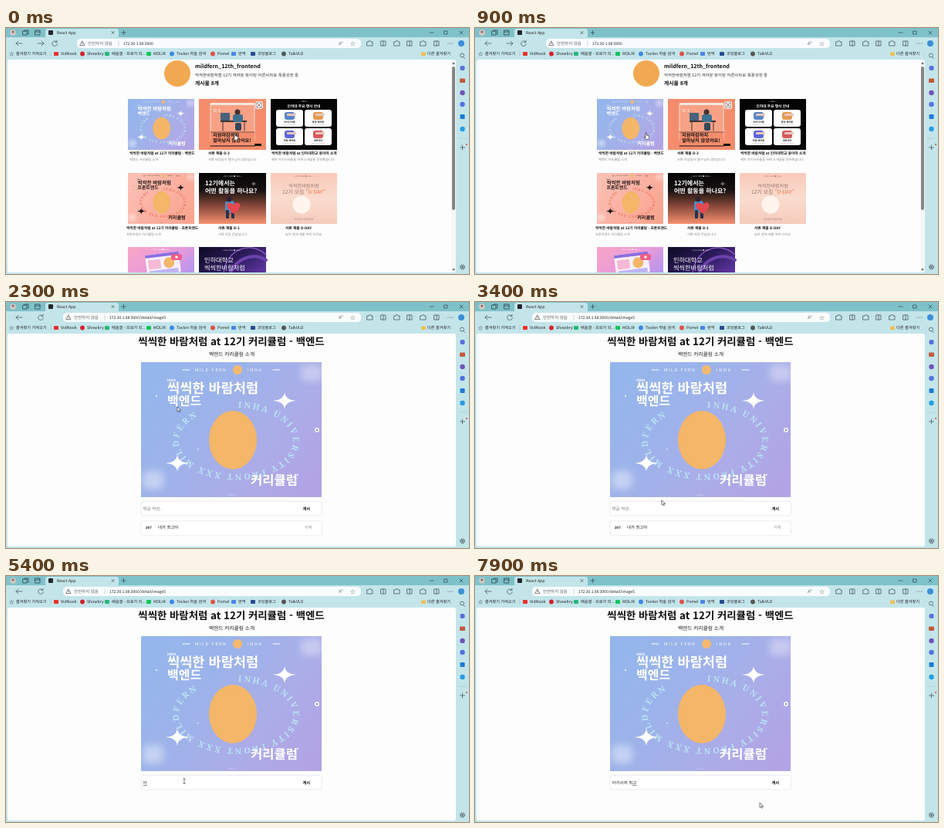
An HTML page that plays this animation: 600 by 319 pixels, repeating every 8 s.

```html
<!DOCTYPE html>
<html lang="ko">
<head>
<meta charset="utf-8">
<title>React App</title>
<style>
html, body { margin: 0; width: 100%; height: 100%; overflow: hidden; background: #c3e5ea; }
svg { display: block; width: 600px; height: 319px; }
text { font-family: "Noto Sans CJK KR", "Noto Sans CJK", sans-serif; text-rendering: geometricPrecision; }
.ring { font: bold 11px "Noto Serif", "Liberation Serif", serif; letter-spacing: 2.5px; }
</style>
</head>
<body>
<svg id="stage" viewBox="0 0 600 319"></svg>
<script>
const CLUB = '씩씩한 바람처럼', CLUB1 = '씩씩한바람처럼';

// y is the vertical middle of the text
const text = (x, y, s, size = 5.2, fill = '#222', weight = 400, anchor = 'start', extra = '') =>
  `<text x="${x}" y="${y + size * .36}" font-size="${size}" fill="${fill}" font-weight="${weight}" text-anchor="${anchor}" ${extra}>${s}</text>`;
const rect = (x, y, w, h, fill, r = 0, extra = '') =>
  `<rect x="${x}" y="${y}" width="${w}" height="${h}" rx="${r}" fill="${fill}" ${extra}/>`;
const dot = (x, y, r, fill, extra = '') => `<circle cx="${x}" cy="${y}" r="${r}" fill="${fill}" ${extra}/>`;
const line = (d, color = '#4a5a5e', w = .8) =>
  `<path d="${d}" fill="none" stroke="${color}" stroke-width="${w}" stroke-linecap="round" stroke-linejoin="round"/>`;
const at = (x, y, body, extra = '') => `<g transform="translate(${x} ${y}) ${extra}">${body}</g>`;
const grad = (id, dir, ...colors) => `<linearGradient id="${id}" ${dir}>` +
  colors.map((c, i) => `<stop offset="${i / (colors.length - 1)}" stop-color="${c}"/>`).join('') + '</linearGradient>';
const down = 'x1="0" y1="0" x2="0" y2="1"', diag = 'x1="0" y1=".2" x2="1" y2=".8"';

const defs = `<defs>
  ${grad('blue', diag, '#94b6ec', '#9cb3ea', '#aaade8', '#b2a4e4')}
  ${grad('peach', diag, '#fbc0b4', '#fbb1a2', '#f9a58f')}
  ${grad('dusk', down, '#050505', '#171010', '#8c4c3c', '#f49070')}
  ${grad('dday', down, '#f9c9ba', '#fadccf', '#f5cbbb')}
  ${grad('pink', diag, '#f6a5c8', '#e99bd8', '#b795ee')}
  ${grad('night', diag, '#120d2c', '#2b1a59', '#5e35a0')}
  <filter id="soft" x="-50%" y="-50%" width="200%" height="200%"><feGaussianBlur stdDeviation="5"/></filter>
  <path id="orbit" d="M123 59A74 43 0 1 1 122.9 59"/>
  <clipPath id="frame"><rect width="234" height="175"/></clipPath>
  <clipPath id="page"><rect x="2" y="41" width="581" height="276" rx="3"/></clipPath>
</defs>`;

const spark = (x, y, c, scale = 1) =>
  `<path transform="translate(${x} ${y}) scale(${scale})" fill="${c}" d="M0-11Q1-1 15 0Q1 1 0 11Q-1 1-15 0Q-1-1 0-11"/>`;

// Course poster, 234 x 175
const poster = (bg, ink, ring, course) => `<g clip-path="url(#frame)">
  ${rect(0, 0, 234, 175, `url(#${bg})`)}
  ${rect(2, 141, 27, 24, '#fff', 7, 'opacity=".4" filter="url(#soft)"')}
  ${rect(207, 3, 28, 22, '#fff', 7, 'opacity=".35" filter="url(#soft)"')}
  ${line('M54 10h9M171 10h9', ink, 1)}
  ${text(70, 10, 'MILD FERN', 5.3, ink, 500, 'start', 'letter-spacing="1.6"')}
  ${text(138, 10, 'INHA', 5.3, ink, 500, 'start', 'letter-spacing="1.8"')}
  ${dot(125, 10, 6, '#f4b96e')}
  ${text(34, 23.5, 'INHA', 4.5, ink, 900)}
  ${text(34, 34, CLUB, 17.6, ink, 900)}
  ${text(34, 50, course, 16, ink, 900)}
  <text class="ring" fill="${ring}"><textPath href="#orbit" startOffset="3">INHA UNIVERSITY FRONT XXX MILDFERN</textPath></text>
  ${spark(186, 50, ink)}${spark(47, 131, ink)}${dot(20, 44, 1, ink)}${dot(74, 113, .8, ink)}
  <ellipse cx="119" cy="101" rx="31" ry="38" fill="#f4b668"/>
  ${text(142, 153, '커리큘럼', 16.6, ink, 900)}
  ${dot(203, 146, .9, ink)}${[-3, 0, 3].map(d => dot(117 + d, 172, .6, ink)).join('')}
</g>`;
const thumb = (x, y, ...p) => at(x, y, poster(...p), 'scale(.3675 .377)');

const dueCard = at(250, 92, rect(0, 0, 87, 66, '#f58d6d') +
  rect(15, 7, 57, 46, '#f9a184', 0, 'stroke="#fff" stroke-width=".7"') +
  rect(15, 5, 57, 3, '#f8e6df') + text(19, 15, 'D-3', 5.5, '#fff', 500) +
  rect(28, 28, 34, 2, '#3c3434') + line('M31 30v11M59 30v11', '#3c3434', 1) +
  rect(28, 18, 12, 10, '#49617d', 1) + dot(50, 17, 3.5, '#43322e') +
  rect(44, 20, 13, 10, '#3d7190', 3) + rect(47, 31, 8, 10, '#35465c', 2) +
  rect(15, 43, 57, 18, '#f58d6d') + line('M15 43h57', '#222', .6) +
  text(18, 47, '지원마감까지', 6.2, '#111', 900) + text(18, 54, '얼마남지 않았어요!', 6.2, '#111', 900) +
  line('M15 61h57', '#111', 1) + rect(72, 58, 9, 3, '#111'));

const eventCard = at(343, 92, rect(0, 0, 86, 66, '#050505') +
  text(43, 3.5, '— INHA —', 2.5, '#ddd', 400, 'middle') +
  text(43, 9, '인하대 주요 행사 안내', 4.7, '#fff', 700, 'middle') +
  [['#5a86c8', '아이디어톤'], ['#e39b52', '중앙 해커톤'], ['#5c68d8', '연합 해커톤'], ['#d85a5a', '데모데이']]
    .map(([c, s], i) => at(7 + i % 2 * 37, 14 + (i >> 1) * 24,
      rect(0, 0, 35, 22, '#fff', 3) + rect(11, 3, 13, 10, c, 3) + rect(14, 5, 12, 3, '#e8c7ba', 1) +
      text(17.5, 16, s, 3.2, '#222', 700, 'middle') + line('M9 19.5h17', '#bbb', .5))).join(''));

const workCard = at(250, 188, rect(0, 0, 87, 66, 'url(#dusk)') +
  text(43, 4, '—  MILD FERN  ●  INHA  —', 2.3, '#ddd', 400, 'middle') +
  text(8, 13.5, '12기에서는', 8, '#fff', 800) + text(8, 23, '어떤 활동을 하나요?', 8, '#fff', 800) +
  spark(71, 14, '#fff6', .3) +
  rect(34, 36, 12, 15, '#4a91ce', 4) + dot(39, 34, 3.6, '#2f2430') + rect(35, 48, 4, 11, '#26344d', 1) +
  rect(42, 48, 4, 11, '#26344d', 1) +
  `<path d="M45 53C30 42 37 35 45 41C52 34 60 43 45 53" fill="#e6484e"/>`);

const ddayCard = at(343, 188, rect(0, 0, 86, 66, 'url(#dday)') +
  text(43, 4, '—  MILD FERN  ●  INHA  —', 2.3, '#9b7468', 400, 'middle') +
  text(43, 16.5, CLUB1, 6.2, '#96776d', 400, 'middle') +
  text(43, 25, '12기 모집 <tspan fill="#ee764e">"D-DAY"</tspan>', 6.8, '#96776d', 500, 'middle') +
  dot(40, 41, 11.5, '#fff5ed') + text(43, 60, '지금 바로 지원하세요', 2.8, '#9b7468', 400, 'middle'));

const screenCard = at(158, 284, rect(0, 0, 86, 36, 'url(#pink)') +
  text(43, 3, '—  MILD FERN  ●  INHA  —', 2.3, '#fff', 400, 'middle') +
  at(22, 11, rect(0, 0, 44, 27, '#f7f0ff', 2) + rect(0, 0, 44, 4, '#8a6ee0', 1) +
    rect(3, 7, 16, 12, '#f6b9d5', 1) + rect(3, 21, 38, 6, '#bfb4f4') + dot(30, 13, 7, '#f4b668'), 'rotate(-7)') +
  rect(56, 9, 14, 8, '#ef5d88', 3) + dot(63, 13, 1.8, '#fff'));

const schoolCard = at(250, 284, rect(0, 0, 87, 36, 'url(#night)') +
  line('M32 36A33 36 0 0 1 87 10', '#9261cf', 1.2) + line('M40 36A33 36 0 0 1 87 17', '#6a43ab', 4) +
  text(43, 4, '—  MILD FERN  ●  INHA  —', 2.3, '#ddd', 400, 'middle') +
  text(7, 17, '인하대학교', 8.2, '#fff', 500) + text(7, 27, CLUB1, 8.2, '#fff', 500));

const caption = (x, y, title, sub) => text(x, y, title, 4.7, '#111', 700) + text(x, y + 8, sub, 4.2, '#8a8a8a');

// Back, optional forward, reload, and the address field
const nav = (dx, url) => line('M21 20h-8m3-3l-3 3l3 3') +
  (dx ? line('M41 20h8m-3-3l3 3l-3 3') : '') +
  at(45 + dx, 20, line('M2.5-2A3.3 3.3 0 1 0 3.3 .6M3-3.8v2.2h-2.2')) +
  rect(74 + dx, 14, 386 - dx, 12, '#f8fcfd', 5) +
  line(`M${81 + dx} 17.2l3 5.4h-6zM${81 + dx} 19v1.5`, '#555', .7) +
  text(88 + dx, 20, '안전하지 않음', 5.5, '#666') + line(`M${128 + dx} 17v6`, '#bbb', .6) +
  text(134 + dx, 20, url, 5, '#222') + text(431, 20, 'A⁾⁾', 5.5, '#666') + text(446, 20, '☆', 7, '#666');

const bookmarks = [
  [65, '#f22d2d', 'VidNook', 1], [99, '#d6202b', 'Showbry'], [131, '#29b779', '배움결 - 프로가 되...', 1],
  [185, '#12c45c', 'MOLIR', 1], [215, '#3f87e8', 'Tovlen 학술 검색'], [268, '#e15045', 'Pomel'],
  [295, '#4a86e8', '번역', 1], [320, '#2b4a92', '코딩블로그', 1], [360, '#555', 'TalkVLO']
].map(([x, c, s, square]) => (square ? rect(x - 3, 31, 6, 5, c, 1) : dot(x, 33.5, 2.9, c)) +
  text(x + 6, 33.5, s)).join('');

const toolIcons = [471, 489, 506, 523, 540, 558].map((x, i) => i % 2
  ? line(`M${x - 3} 17h6v6h-6zM${x} 17v6`) : line(`M${x - 3} 18h2a1.5 1.5 0 0 1 3 0h2v5h-7z`)).join('') +
  [573, 576, 579].map(x => dot(x, 20, .6, '#445')).join('');

const sidebar = line('M592.5 37.5l2 2') + dot(591, 35.5, 2.5, 'none', 'stroke="#4a5a5e" stroke-width=".8"') +
  rect(588.5, 49, 6, 6, '#5a71d8', 2) + rect(588, 65.5, 7, 5.5, '#c35a3b', 1) +
  dot(591.5, 84, 3.2, '#7052b6') + dot(591.5, 99, 3.2, '#5470df') + rect(588.5, 112, 6, 6, '#1b7bd0', 1) +
  dot(591.5, 131, 3.2, '#269de4') + line('M586 143h11', '#99bcc3', .5) + line('M588.5 155h6M591.5 152v6') +
  dot(597, 151, 1, '#d34a34') + dot(591.5, 310, 2.7, 'none', 'stroke="#4a5a5e" stroke-width="1.3" stroke-dasharray="1.5 .6"') +
  dot(591.5, 310, 1.2, '#4a5a5e');

const chrome = rect(0, 0, 600, 319, '#c3e5ea') + rect(0, 0, 600, 12, '#7fc1c9') +
  rect(51, 1, 95, 12, '#c3e5ea', 3) + dot(9, 6, 3.8, '#d9c9c2') + dot(9, 5, 1.6, '#7b6a68') +
  line('M22 4h5v5h-5zM24 4v-1h5v5h-1M38 3h6v6h-6zM38 5h6', '#29474c') +
  rect(55, 3, 6, 6, '#24262b', 1) + text(66, 6, 'React App', 5.2) +
  line('M137 4.5l3 3m0-3l-3 3M150 6h5M152.5 3.5v5', '#29474c', .7) +
  line('M549 6h5M568 4h4v4h-4zM588 4l4 4m0-4l-4 4', '#29474c', .7) +
  toolIcons + dot(590, 20, 4, '#3c8fd6') + text(4, 33.5, '☆', 6.5) + text(13, 33.5, '즐겨찾기 가져오기') +
  line('M58 30.5v6', '#92b5bb', .5) + bookmarks +
  rect(538, 31.5, 6, 4.5, '#eec04f', 1) + text(546, 33.5, '다른 즐겨찾기') + sidebar +
  rect(2, 41, 581, 276, '#fdfdfe', 3);

const list = `<g id="list">${nav(18, '172.30.1.98:3000')}<g clip-path="url(#page)">
  ${dot(222, 59, 17, '#f1a951')}
  ${text(245, 49, 'mildfern_12th_frontend', 7.1, '#111', 700)}
  ${text(245, 61.5, CLUB1 + ' 12기 여러분 화이팅 어른사자로 폭풍성장 중', 5.4, '#333')}
  ${text(245, 71.5, '게시물 8개', 6.8, '#111', 700)}
  ${thumb(158, 92, 'blue', '#fff', '#b9e2f4', '백엔드')}${dueCard}${eventCard}
  ${thumb(158, 188, 'peach', '#241817', '#ee6f55', '프론트엔드')}${workCard}${ddayCard}${screenCard}${schoolCard}
  ${caption(160, 162.5, CLUB + ' at 12기 커리큘럼 - 백엔드', '백엔드 커리큘럼 소개')}
  ${caption(262, 162.5, '서류 제출 D-3', '서류 마감일이 얼마 남지 않았습니다')}
  ${caption(344, 162.5, CLUB + ' at 인하대학교 동아리 소개', '예비 아기사자들을 위해 소개글을 준비했습니다')}
  ${caption(156, 259, CLUB + ' at 12기 커리큘럼 - 프론트엔드', '프론트엔드 커리큘럼 소개')}
  ${caption(275, 259, '서류 제출 D-1', '서류 마감 전날입니다')}
  ${caption(362, 259, '서류 제출 D-DAY', '늦지 않게 제출 부탁 드려요')}
  ${rect(577, 41, 6, 276, '#f6f6f7')}${rect(578, 50, 4, 186, '#858585', 2)}
  <path d="M578 47l2-3l2 3zM578 312l2 3l2-3z" fill="#777"/>
  <g id="lens">${rect(-5, -5, 10, 10, '#f3f0ef', 3, 'opacity=".9"')}${line('M-3-1v-2h2M1-3h2v2M3 1v2h-2M-1 3h-2v-2', '#666', .7)}${dot(0, 0, 1.1, '#666')}</g>
</g></g>`;

const detail = `<g id="detail">${nav(0, '172.30.1.98:3000/detail/image5')}
  ${text(292, 51, CLUB + ' at 12기 커리큘럼 - 백엔드', 13.4, '#111', 700, 'middle')}
  ${text(292.5, 68, '백엔드 커리큘럼 소개', 6.7, '#222', 400, 'middle')}
  ${at(175, 78, poster('blue', '#fff', '#b9e2f4', '백엔드'))}
  ${dot(403, 166, 3, '#f3f4fc')}${dot(403, 166, 1.2, '#8d91b4')}
  ${rect(175, 258.5, 234.5, 18.5, '#fff', 3, 'stroke="#e4e4e8" stroke-width=".7"')}
  ${text(177.5, 268, '', 5.5, '#222', 400, 'start', 'id="field"')}
  ${text(384.5, 268, '게시', 5.3, '#111', 700)}
  <g id="comment">${rect(175, 284, 234.5, 19, '#fff', 3, 'stroke="#e4e4e8" stroke-width=".7"')}
  ${text(181, 292.5, '207', 4.4, '#111', 700)}${text(197, 292.5, '내가 최고야', 5.4)}${text(387, 292.5, '삭제', 5.3, '#999')}</g>
</g>`;

const pointers = `<g id="arrow"><path d="M0 0v6.2l1.5-1.3l1 2.2l1-.5l-1-2.1h2z" fill="#fff" stroke="#222" stroke-width=".6"/></g>
  <g id="hand"><path d="M-1 0h1.4v3l3 .8v3l-1 1.5h-3l-2-3l1.6 .7z" fill="#fff" stroke="#222" stroke-width=".6"/></g>
  <g id="beam">${line('M-1.2-3h2.4M0-3v6M-1.2 3h2.4', '#222', .6)}</g>`;

const $ = id => document.getElementById(id);
$('stage').innerHTML = defs + chrome + list + detail + pointers;

const path = [[0, 297, 137], [700, 297, 137], [900, 222, 136], [2700, 222, 136], [2900, 242, 257], [3400, 242, 257],
  [3600, 391, 290], [4400, 391, 290], [4700, 300, 276], [4900, 300, 276], [5100, 231, 266], [7400, 231, 266],
  [7800, 369, 294], [8000, 369, 294]];
// [time, settled text, syllable being composed]
const typing = [[5400, '', '아'], [5600, '', '악'], [5700, '아', '기'], [6000, '아기', 'ㅅ'], [6100, '아기', '사'],
  [6300, '아기사', '자'], [6500, '아기사자 ', 'ㅊ'], [6700, '아기사자 ', '최'], [6900, '아기사자 최', 'ㄱ'], [7100, '아기사자 최', '고']];

function cursorAt(t) {
  const i = path.findIndex(p => p[0] > t), [t0, x0, y0] = path[i - 1], [t1, x1, y1] = path[i];
  const k = (t - t0) / (t1 - t0);
  return [x0 + (x1 - x0) * k, y0 + (y1 - y0) * k];
}
const show = (id, on) => $(id).setAttribute('display', on ? 'inline' : 'none');
const place = (id, x, y) => $(id).setAttribute('transform', `translate(${x} ${y})`);

function draw() {
  const t = Math.floor(performance.now() % 8000 / 100) * 100;
  const opened = t >= 2200, [x, y] = cursorAt(t);
  show('list', !opened);
  show('detail', opened);
  show('comment', t < 4000);
  place('lens', t < 1000 ? 328 : 236, 100);

  const inField = t >= 5000 && x < 380 && y > 259 && y < 277;
  const kind = inField ? 'beam' : !opened || (t >= 3600 && t < 4500) ? 'hand' : 'arrow';
  for (const id of ['arrow', 'hand', 'beam']) {
    show(id, id === kind);
    place(id, x, y);
  }

  const typed = typing.filter(k => k[0] <= t).pop();
  $('field').setAttribute('fill', typed ? '#222' : '#777');
  $('field').innerHTML = typed ? `${typed[1]}<tspan text-decoration="underline">${typed[2]}</tspan>` : '댓글 작성..';
  requestAnimationFrame(draw);
}
draw();
</script>
</body>
</html>
```
